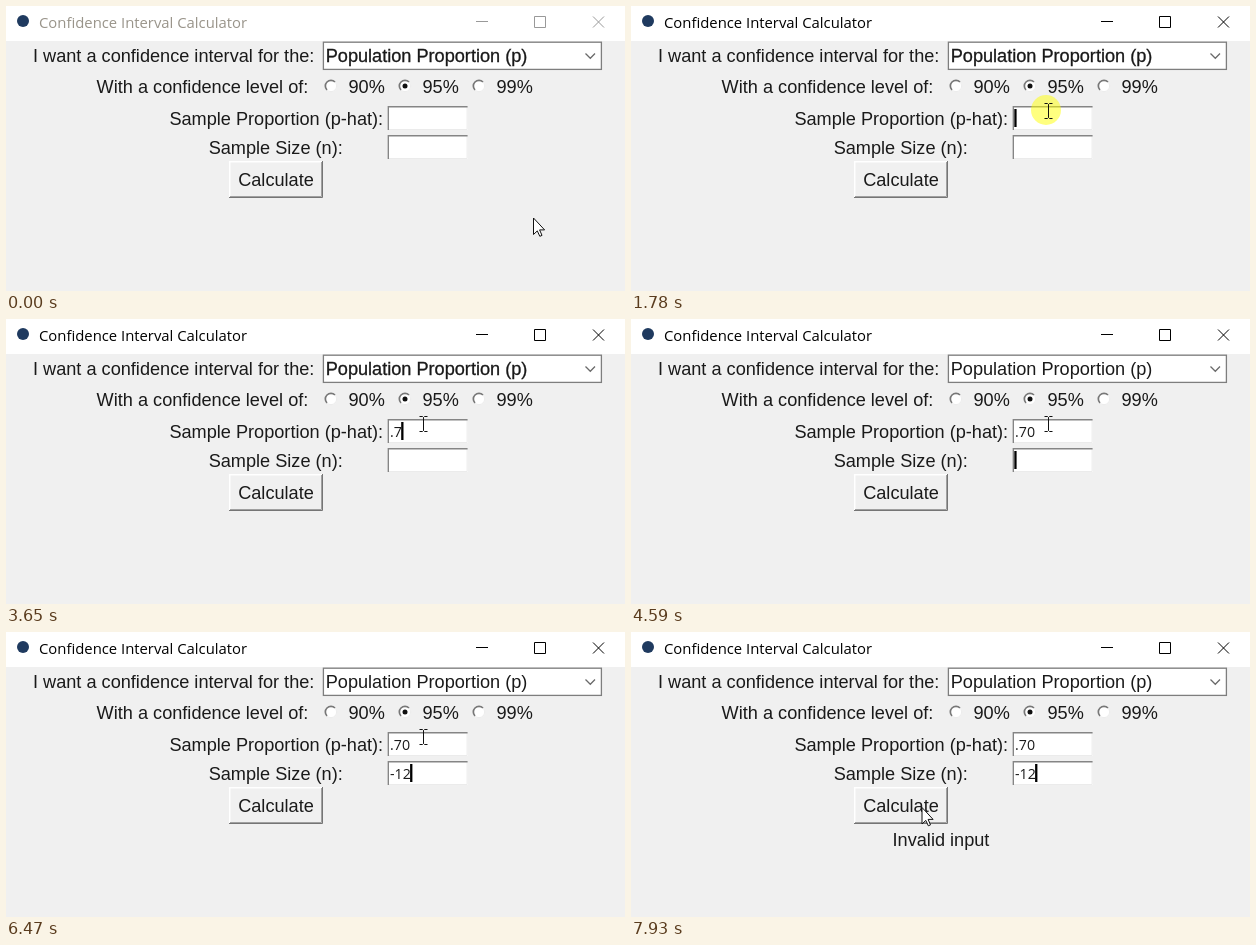
An HTML page for the animation above (8 s loop, 619 px wide and 285 px high).

```html
<!DOCTYPE html>
<html lang="en">
<head>
<meta charset="utf-8">
<title>Confidence Interval Calculator</title>
<style>
  html, body { margin: 0; width: 100%; height: 100%; overflow: hidden; background: #f0f0f0; }
  svg { display: block; }
  text { font: 18.15px "Liberation Sans", Arial, sans-serif; fill: #1a1a1a; }
  .mid { text-anchor: middle; }
  .ui { font: 14.85px "Open Sans", "Noto Sans", sans-serif; }
  .entry { font-size: 14.2px; }
  .line { fill: none; }
</style>
</head>
<body>
<svg width="619" height="285" viewBox="0 0 619 285">
  <defs>
    <g id="entry">
      <rect width="80" height="24" fill="#fff"/>
      <path class="line" d="M79.5 1V23.5H1" stroke="#ebebeb"/>
      <path class="line" d="M.7 24V.7H80" stroke="#858585" stroke-width="1.4"/>
    </g>
    <g id="radio">
      <circle r="6" fill="#fff"/>
      <path class="line" d="M-4 4A5.6 5.6 0 0 1 4 -4" stroke="#777" stroke-width="1.7"/>
      <path class="line" d="M-4 4A5.6 5.6 0 0 0 4 -4" stroke="#ececec"/>
    </g>
  </defs>
  <rect width="619" height="285" fill="#f0f0f0"/>

  <rect width="619" height="35" fill="#fff"/>
  <circle cx="17" cy="15" r="6" fill="#1f3a5f"/>
  <text id="title" class="ui" x="33" y="22">Confidence Interval Calculator</text>
  <path id="controls" class="line" d="M470 15.5H482M528.5 10.5H539.5V21.5H528.5ZM587 10.5L598 21.5M598 10.5L587 21.5"/>

  <text class="mid" x="167.7" y="56">I want a confidence interval for the:</text>
  <rect x="317.4" y="36.2" width="278" height="27.2" fill="#fff" stroke="#7e7e7e" stroke-width="1.3"/>
  <text id="choice" x="319.7" y="56" stroke="#1a1a1a">Population Proportion (p)</text>
  <path class="line" d="M579.5 47.5L584.3 52.3L589 47.5" stroke="#6a6a6a" stroke-width="1.3"/>

  <text class="mid" x="196.5" y="87">With a confidence level of:</text>
  <use href="#radio" x="325" y="80"/><text x="342.5" y="87">90%</text>
  <use href="#radio" x="399" y="80"/><text x="416.5" y="87">95%</text>
  <use href="#radio" x="473" y="80"/><text x="490.5" y="87">99%</text>
  <circle cx="399" cy="80" r="2.5" fill="#111"/>

  <text class="mid" x="270.3" y="118.5">Sample Proportion (p-hat):</text>
  <use href="#entry" x="381.6" y="100"/>
  <text class="mid" x="269.7" y="147.5">Sample Size (n):</text>
  <use href="#entry" x="381.6" y="129"/>
  <text id="prop" class="ui entry" x="384" y="117.5"></text>
  <text id="size" class="ui entry" x="384" y="146.5"></text>
  <rect id="caret" width="2.3" height="18" fill="#000"/>

  <rect x="223" y="155" width="94" height="37" fill="#f0f0f0"/>
  <path class="line" d="M223.7 191V155.7H316" stroke="#fff" stroke-width="1.5"/>
  <path class="line" d="M224 190.5H315.5V156" stroke="#a0a0a0"/>
  <path class="line" d="M223 191.5H316.5V155" stroke="#757575"/>
  <text class="mid" x="270" y="180">Calculate</text>
  <text id="result" class="mid" x="310" y="214">Invalid input</text>

  <circle id="click" r="15" fill="#ff0" fill-opacity=".5"/>
  <path id="arrow" d="M.5 .5V17L4.3 13.4L6.8 18.8L9 17.9L6.6 12.4H11.6Z" fill="#fff" stroke="#111"/>
  <path id="beam" class="line" d="M-4 -7.5H-1L0 -6.5L1 -7.5H4M0 -6.5V6.5M-4 7.5H-1L0 6.5L1 7.5H4" stroke="#111"/>
</svg>
<script>
const $ = id => document.getElementById(id);
const show = (id, on) => $(id).style.display = on ? "" : "none";
const place = (id, x, y) => $(id).setAttribute("transform", `translate(${x} ${y})`);

// Pointer legs: start time, steps, step length, end x, end y
const legs = [
  [70, 3, 75, 553, 166],
  [930, 1, 75, 525, 142.5],
  [1005, 7, 75, 420, 103],
  [1630, 1, 75, 417.5, 105],
  [7000, 9, 77.5, 290.5, 175]
];
const typing = {
  prop: [[3030, "."], [3570, ".7"], [3970, ".70"]],
  size: [[5750, "-"], [6070, "-1"], [6150, "-12"]]
};
// The caret toggles at each of these times, starting hidden
const blinks = [1780, 2410, 2730, 3340, 3650, 4270, 4590, 5220, 5520, 6070, 6470, 7078, 7388];

function pointer(t) {
  let x = 527, y = 211.5;
  for (const [start, n, dt, toX, toY] of legs) {
    if (t < start) break;
    const k = Math.min(n, Math.floor((t - start) / dt) + 1);
    const p = 1 - (1 - k / n) ** 1.5;
    x += (toX - x) * p;
    y += (toY - y) * p;
  }
  return [x, y];
}

function draw(t) {
  const active = t >= 1780;
  $("title").style.fill = active ? "#000" : "#99948a";
  $("controls").style.stroke = active ? "#000" : "#999";
  $("choice").style.strokeWidth = t < 4590 ? .3 : 0;

  for (const id in typing) {
    const typed = typing[id].filter(([at]) => t >= at).pop();
    $(id).textContent = typed ? typed[1] : "";
  }
  const field = t < 4590 ? "prop" : "size";
  const width = $(field).textContent ? $(field).getComputedTextLength() : 0;
  place("caret", 383.3 + width, field === "prop" ? 103 : 132);
  show("caret", blinks.filter(at => t >= at).length % 2);

  show("result", t >= 7930);
  const first = t >= 1780 && t < 2010;
  show("click", first || t >= 7850 && t < 7930);
  place("click", first ? 415 : 291, first ? 104 : 175);

  const [x, y] = pointer(t);
  const overEntry = x > 381 && x < 462 && y > 100 && y < 152;
  show("arrow", !overEntry);
  show("beam", overEntry);
  place("arrow", x, y);
  place("beam", x, y);
}

const begin = performance.now();
function frame() {
  draw((performance.now() - begin) % 8000);
  requestAnimationFrame(frame);
}
frame();
</script>
</body>
</html>
```
